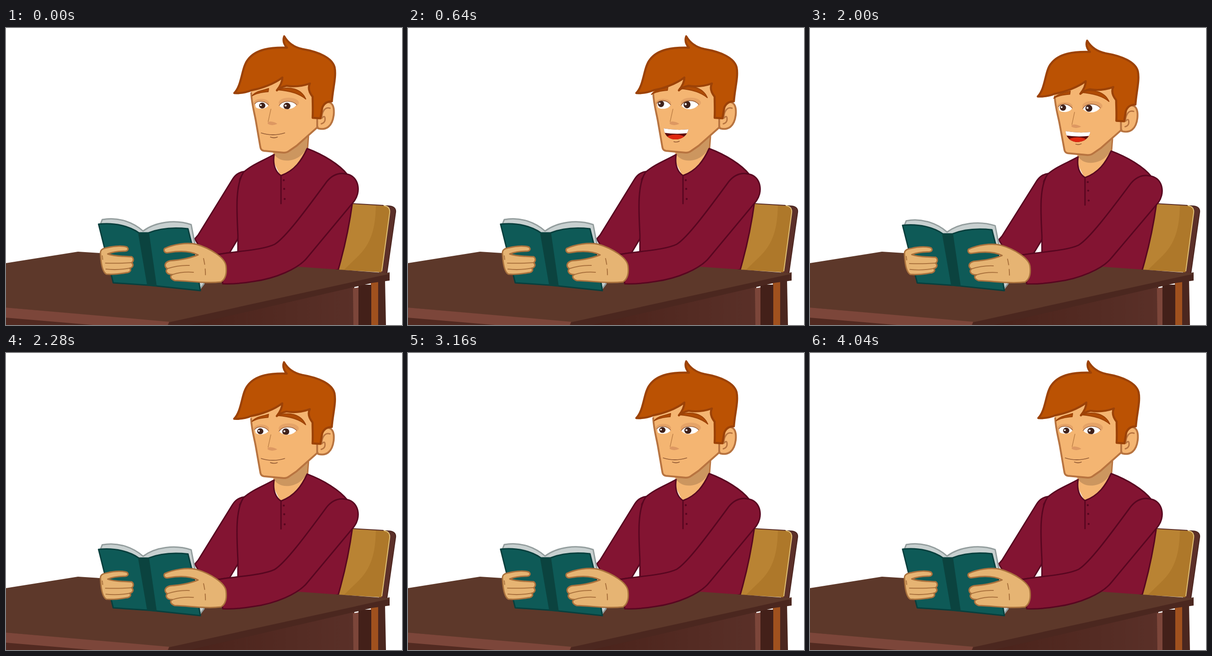
These frames come from a looping animation (864x648 px, 4120 ms). An HTML page:

```html
<!DOCTYPE html>
<html lang="en">
<head>
<meta charset="utf-8">
<title>Reader at a desk</title>
<style>
html, body { margin: 0; width: 100%; height: 100%; overflow: hidden; background: #fff; }
svg { display: block; width: 100vw; height: 100vh; }
path, line { stroke-linecap: round; stroke-linejoin: round; }
.line { fill: none; }
.shirt { fill: #831432; stroke: #580620; stroke-width: 3; }
.skin { fill: #f4b572; stroke: #b87440; stroke-width: 4; }
.hand { fill: #e6b473; stroke: #a9713d; stroke-width: 3; }
.crease { fill: none; stroke: #a9713d; stroke-width: 2; }
.hair { fill: #bb5203; stroke: #9c4207; stroke-width: 4.5; }
.brow { fill: #b04c05; stroke: #9c4207; stroke-width: 2; }
.lid { fill: #d9955f; }
.iris { fill: #3f211a; }
</style>
</head>
<body>
<svg viewBox="0 0 864 648" preserveAspectRatio="none">
  <defs>
    <clipPath id="eyeL"><path d="M543 165C548 157 565 157 573 168C568 178 550 178 545 173Z"/></clipPath>
    <clipPath id="eyeR"><path d="M596 169C603 157 624 156 634 167C627 179 605 181 596 169Z"/></clipPath>
    <clipPath id="lips"><path d="M558 219Q585 224 612 221C608 238 594 244 580 243C566 241 559 232 558 219Z"/></clipPath>
    <linearGradient id="panel"><stop offset="0" stop-color="#482119"/><stop offset="1" stop-color="#5a3028"/></linearGradient>
  </defs>

  <g id="chair">
    <path fill="#5c3029" stroke="#4b251f" stroke-width="2" d="M828 388Q852 387 850 402L831 535H815Z"/>
    <path fill="#ae782a" d="M740 383L823 387Q839 388 837 404L819 533L715 527Z"/>
    <path fill="#b98333" d="M740 383L807 387C806 435 798 470 766 500L738 527H715Z"/>
    <path class="line" stroke="#e2c277" stroke-width="2" d="M826 388Q839 390 837 404L820 530"/>
    <path class="line" stroke="#5c3029" stroke-width="2" d="M755 383L823 387"/>
  </g>

  <g class="body">
    <path class="shirt" d="M520 313C506 315 499 322 493 332L419 452L412 460L420 474L462 494L488 490L510 453V330Z"/>
    <path fill="#f4b572" d="M582 262L585 295L600 325L640 306L659 262V230Z"/>
    <path fill="#cc965f" d="M584 272C592 293 622 294 641 280Q654 270 660 255V235L612 270Z"/>
    <path class="line" stroke="#b87440" stroke-width="3" d="M660 236L658 262"/>
    <path class="shirt" d="M585 276C581 300 590 316 600 322C630 311 645 289 657 263C692 276 728 298 745 320L756 380C750 425 740 475 725 527L640 545L506 500V452C504 405 499 345 518 315C537 298 560 290 585 276Z"/>
    <path class="line" stroke="#580620" stroke-width="3" d="M600 322V383"/>
    <g fill="#580620"><circle cx="606" cy="332" r="2.2"/><circle cx="607" cy="351" r="2.2"/><circle cx="608" cy="373" r="2.2"/></g>

    <g id="head">
      <path class="skin" d="M686 168C704 155 718 162 715 190C712 214 699 224 681 219L675 205Z"/>
      <path class="line" stroke="#b87440" stroke-width="3" d="M707 175C694 171 689 186 689 197Q697 188 696 201Q695 207 688 209"/>
      <path fill="#f4b572" d="M534 138L545 200L557 266L612 272L632 259L679 217L684 150L664 112L600 100Z"/>
      <path class="line" stroke="#b87440" stroke-width="4" d="M535 142C536 165 542 185 545 202L555 260Q556 267 563 268L606 272Q613 272 618 268L634 257L679 217V199"/>
      <path id="browL" class="brow" d="M537 148C544 138 559 137 573 132L572 139C559 140 546 142 537 148Z"/>
      <path id="browR" class="brow" d="M593 135C617 126 644 132 654 155C640 143 619 137 593 135Z"/>
      <path class="hair" d="M498 142C515 125 514 87 527 70C545 45 580 42 613 43C605 34 604 26 607 18C615 32 628 42 647 46C682 52 712 65 717 86C721 106 713 132 711 160C699 160 693 166 690 174L686 197L669 196C670 179 669 165 669 150C662 141 658 131 663 121C646 127 629 129 612 126Q599 129 591 136C599 126 603 118 603 108C585 122 557 132 535 136Q519 143 498 142Z"/>

      <ellipse class="lid" cx="557" cy="164" rx="17" ry="9.5"/>
      <ellipse class="lid" cx="617" cy="163" rx="22" ry="11"/>
      <g id="shut" class="line" stroke="#513022" stroke-width="2">
        <path d="M545 170Q557 176 571 171"/><path d="M598 171Q616 179 634 169"/>
      </g>
      <g id="eyes">
        <g clip-path="url(#eyeL)">
          <path fill="#fff" d="M540 154H576V182H540Z"/>
          <g id="irisL"><circle class="iris" cx="559" cy="169" r="6.8"/><circle cx="556" cy="168" r="2" fill="#fff"/></g>
        </g>
        <g clip-path="url(#eyeR)">
          <path fill="#fff" d="M594 154H638V182H594Z"/>
          <g id="irisR"><circle class="iris" cx="613" cy="170" r="7.6"/><circle cx="610" cy="169" r="2.2" fill="#fff"/></g>
        </g>
        <g class="line" stroke="#955b36" stroke-width="1.5">
          <path d="M543 165C548 157 565 157 573 168"/><path d="M596 169C603 157 624 156 634 167"/>
        </g>
      </g>

      <path fill="#dd9862" d="M571 206C576 202 586 205 592 209Q580 215 571 209Z"/>
      <path class="line" stroke="#c18349" stroke-width="1.6" d="M578 177L572 204"/>
      <g id="smile" class="line" stroke="#945c35" stroke-width="1.8">
        <path d="M557 229Q582 237 608 229"/><path d="M577 238Q585 241 592 238"/>
      </g>
      <g id="laugh">
        <g clip-path="url(#lips)">
          <path fill="#5e0c0b" d="M550 215H620V248H550Z"/>
          <ellipse cx="584" cy="240" rx="20" ry="7.5" fill="#df2810"/>
          <path fill="#fff" d="M555 215H615V229Q584 233 555 228Z"/>
        </g>
        <path class="line" stroke="#945c35" stroke-width="1.6" d="M580 248Q586 250 592 247"/>
      </g>
    </g>
  </g>

  <g id="desk">
    <path fill="#4b271f" d="M812 550H827L829 648H812Z"/>
    <path fill="#a0511e" d="M796 554H812V648H796Z"/>
    <path fill="#432019" d="M769 560H797V648H769Z"/>
    <path fill="url(#panel)" d="M357 640L760 560V648H350Z"/>
    <path fill="#7c463a" d="M757 568L769 566V648H758Z"/>
    <path fill="#4b271f" d="M355 641L837 533V551L800 556L400 648H355Z"/>
    <path fill="#5d382a" d="M0 513L157 488L300 497L837 535L834 537L356 642L0 611Z"/>
    <path fill="#522a21" d="M0 610L356 642V648H0Z"/>
    <path fill="#7c463a" d="M0 610L356 641L353 648H190L0 632Z"/>
  </g>

  <g class="body">
    <path class="shirt" d="M745 319C769 324 777 358 757 381L658 500C638 526 586 547 540 553Q506 559 473 558L463 494C500 487 559 485 586 472C612 456 663 385 700 335C714 318 730 315 745 319Z"/>
    <path fill="#c8d0d0" stroke="#949e9e" stroke-width="3" d="M206 428L210 418C246 411 279 425 299 443C326 423 369 417 404 429L410 460L432 558L422 571L300 550Z"/>
    <path fill="#0e5a57" stroke="#083f3d" stroke-width="3" d="M202 428C239 424 270 433 290 447H311C338 436 369 435 397 438L412 498L424 573L329 563L308 561L234 556Z"/>
    <path fill="#0b433f" d="M288 446H312L329 564L308 562Z"/>

    <path class="hand" d="M206 491C206 482 213 481 222 479C237 475 257 475 264 478C269 483 265 487 258 487C244 487 232 489 222 493C237 499 262 498 274 499C280 503 278 510 274 512C280 517 276 523 270 524C275 530 268 534 262 534C246 537 230 538 219 537C211 533 207 514 206 491Z"/>
    <path class="crease" d="M217 513Q245 514 274 512M218 526Q243 529 270 524M210 497L211 505"/>

    <path class="hand" d="M346 481C365 472 395 467 416 472C446 481 478 501 480 519C482 535 479 548 469 554C437 558 402 552 368 551C358 547 357 541 363 538C350 538 347 530 352 525C344 520 346 511 357 508C376 506 397 504 419 495C401 486 379 486 355 490C346 492 343 486 346 481Z"/>
    <path class="crease" d="M352 525Q376 517 400 518M363 538Q385 531 409 533"/>
    <path class="crease" stroke-dasharray="13 10" d="M431 503Q436 524 435 547"/>
  </g>
</svg>
<script>
const LOOP = 4120, FLOOR = 570, CHIN = 260;
const $ = id => document.getElementById(id);
const bodies = document.querySelectorAll('.body'), lids = document.querySelectorAll('.lid');
const set = (id, name, value) => $(id).setAttribute(name, value);
const move = (id, x, y, scale = '') => set(id, 'transform', `translate(${x} ${y})${scale}`);
const show = (id, on) => set(id, 'visibility', on ? 'visible' : 'hidden');

// Eased value between [time, value] keys
function at(t, keys) {
  let i = keys.findIndex(k => k[0] > t);
  if (i < 0) return keys[keys.length - 1][1];
  if (i === 0) return keys[0][1];
  const [t0, a] = keys[i - 1], [t1, b] = keys[i];
  const u = (t - t0) / (t1 - t0);
  return a + (b - a) * u * u * (3 - 2 * u);
}

const DIP = [[60, 0], [310, 10], [640, 0], [1799, 0], [1800, 6], [1960, 10], [2280, 2], [2400, 0]];
const TALK = [[120, 0], [420, 1], [1860, 1], [2220, 0]];
const LOOK_X = [[80, 0], [440, -7], [1860, -7], [2260, -4], [3480, -4], [4000, 0]];
const LOOK_Y = [[80, 0], [440, -3], [1860, -3], [2260, 0], [2700, 0], [2900, -1.5], [3480, -1.5], [4000, 0]];
const OPEN = [[2600, 1], [2840, 0], [2920, 0], [3180, 1]];

function draw(t) {
  const dip = at(t, DIP), talk = at(t, TALK), open = at(t, OPEN);
  const x = at(t, LOOK_X), y = at(t, LOOK_Y);

  const s = 1 - dip / (FLOOR - 17);
  bodies.forEach(b => b.setAttribute('transform', `matrix(1 0 0 ${s} 0 ${FLOOR * (1 - s)})`));
  const lean = dip * 0.001;
  set('head', 'transform', `matrix(1 0 ${lean} 1 ${-lean * CHIN} 0)`);

  move('browL', -6 * talk, -3 * talk);
  move('browR', -talk, -3 * talk);
  move('irisL', x, y);
  move('irisR', x * 0.6, y * 0.8);
  const lift = open * (0.95 + 0.1 * talk);
  move('eyes', 0, 175 * (1 - lift), ` scale(1 ${lift})`);
  show('eyes', open > 0.03);
  show('shut', open < 0.25);
  lids.forEach(l => l.setAttribute('opacity', 1 - 0.45 * open));

  show('laugh', talk > 0.5);
  show('smile', talk <= 0.5);
}

const start = performance.now();
function tick() {
  draw((performance.now() - start) % LOOP);
  requestAnimationFrame(tick);
}
tick();
</script>
</body>
</html>
```
